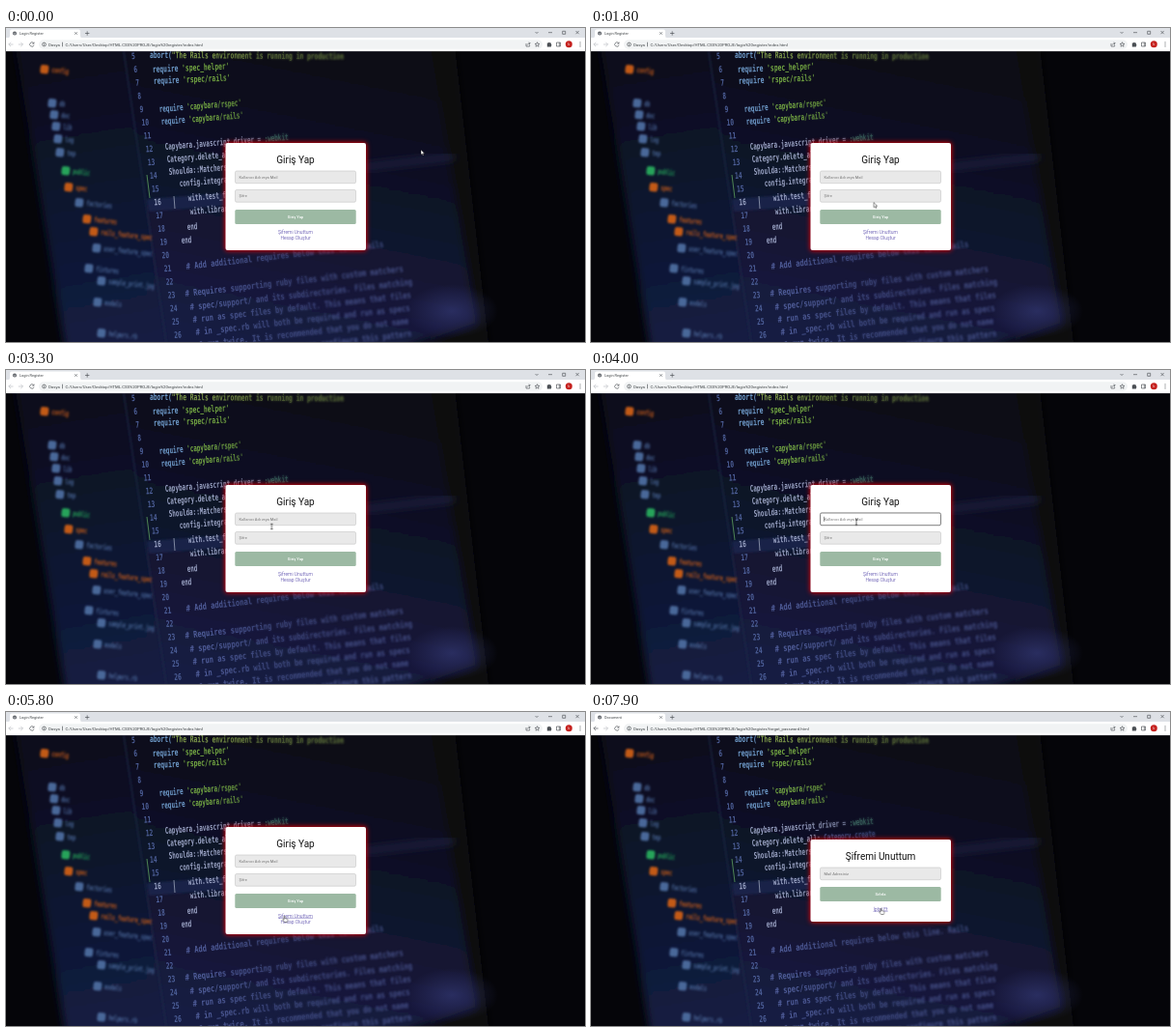
Animation of 600x325 px, one loop 8000 ms. Source, as an HTML page:

```html
<!DOCTYPE html>
<html lang="tr">
<head>
<meta charset="utf-8">
<title>Login Register</title>
<style>
html, body { margin: 0; width: 100%; height: 100%; overflow: hidden; background: #050509; }
svg { display: block; width: 100vw; height: 100vh; }
text { font-family: Roboto, Arial, sans-serif; white-space: pre; }
.ui text { font-size: 4.28px; fill: #3c4043; }
.icon { fill: none; stroke: #4b4f54; stroke-width: .65; }
.code text, .tree text { font-family: "DejaVu Sans Mono", monospace; font-weight: bold; }
.card text { text-anchor: middle; }
.card .title { font-size: 10px; fill: #111; }
.card .hint { font-size: 4.05px; fill: #777; text-anchor: start; }
.card .link { font-size: 5px; font-weight: 300; fill: #3a2b9c; }
.card .label { font-size: 4.1px; font-weight: 500; fill: #fff; }
.glow { fill: #e8000c; filter: url(#halo); }
.field { fill: #e9e9e9; stroke: #c4c4c4; stroke-width: .6; }
.button { fill: #9cb9a3; }
.focus { fill: #fff; stroke: #555; stroke-width: .7; }
.line { stroke: #3a2b9c; stroke-width: .4; }

.step { animation: 8s step-end infinite; opacity: 0; }
.login { animation-name: login; opacity: 1; }
.forgot { animation-name: forgot; }
.user-focus { animation-name: userFocus; }
.pass-focus { animation-name: passFocus; }
.forgot-line { animation-name: forgotLine; }
.cancel-line { animation-name: cancelLine; }
.arrow { animation-name: arrow; }
.beam { animation-name: beam; }
.hand { animation-name: hand; }
.login-button { animation: loginButton 8s linear infinite; }
.reset-button { animation: resetButton 8s linear infinite; }
.caret { animation: blink 1s step-end infinite; }
.pointer { animation: travel 8s ease-in-out infinite; }

@keyframes login { 0% { opacity: 1 } 77.5%, 100% { opacity: 0 } }
@keyframes forgot { 0% { opacity: 0 } 77.5%, 100% { opacity: 1 } }
@keyframes userFocus { 0% { opacity: 0 } 43% { opacity: 1 } 58%, 100% { opacity: 0 } }
@keyframes passFocus { 0% { opacity: 0 } 60% { opacity: 1 } 65%, 100% { opacity: 0 } }
@keyframes forgotLine { 0% { opacity: 0 } 70.2% { opacity: 1 } 77.5%, 100% { opacity: 0 } }
@keyframes cancelLine { 0% { opacity: 0 } 92.5%, 100% { opacity: 1 } }
@keyframes arrow {
  0% { opacity: 1 } 16% { opacity: 0 } 21% { opacity: 1 } 39% { opacity: 0 }
  66% { opacity: 1 } 70.2% { opacity: 0 } 77.5% { opacity: 1 } 80.8% { opacity: 0 }
  88.7% { opacity: 1 } 92.5%, 100% { opacity: 0 }
}
@keyframes beam {
  0% { opacity: 0 } 16% { opacity: 1 } 21% { opacity: 0 } 39% { opacity: 1 }
  66% { opacity: 0 } 80.8% { opacity: 1 } 88.7%, 100% { opacity: 0 }
}
@keyframes hand {
  0% { opacity: 0 } 70.2% { opacity: 1 } 77.5% { opacity: 0 } 92.5%, 100% { opacity: 1 }
}
@keyframes loginButton {
  0%, 26% { fill: #9cb9a3 } 29%, 37% { fill: #020804 } 40%, 66% { fill: #9cb9a3 }
  67.5%, 68.5% { fill: #3c4840 } 71%, 100% { fill: #9cb9a3 }
}
@keyframes resetButton {
  0%, 79% { fill: #9cb9a3 } 80.5% { fill: #4c5a50 } 82.4%, 88.6% { fill: #9cb9a3 }
  90.8% { fill: #3c4840 } 94%, 100% { fill: #9cb9a3 }
}
@keyframes blink { 50% { opacity: 0 } }
@keyframes travel {
  0%, 4% { transform: translate(430px, 126px) }
  14% { transform: translate(325px, 164px) }
  22.5% { transform: translate(293px, 180.5px) }
  32.5%, 36% { transform: translate(277.5px, 192.5px) }
  43%, 54% { transform: translate(275px, 157.5px) }
  59%, 64% { transform: translate(271px, 175px) }
  72.5%, 76.5% { transform: translate(288.5px, 211px) }
  82.5%, 87% { transform: translate(271.5px, 171px) }
  95%, 100% { transform: translate(300.5px, 203px) }
}
</style>
</head>
<body>
<svg viewBox="0 0 600 325" preserveAspectRatio="none">
  <defs>
    <linearGradient id="screen" gradientUnits="userSpaceOnUse" x1="330" y1="24" x2="270" y2="325">
      <stop offset="0" stop-color="#0a0b16"/>
      <stop offset=".5" stop-color="#10132a"/>
      <stop offset="1" stop-color="#171c42"/>
    </linearGradient>
    <linearGradient id="side" gradientUnits="userSpaceOnUse" x1="60" y1="24" x2="110" y2="325">
      <stop offset="0" stop-color="#090d1c"/>
      <stop offset=".5" stop-color="#0e152e"/>
      <stop offset="1" stop-color="#131d42"/>
    </linearGradient>
    <radialGradient id="haze">
      <stop offset="0" stop-color="#343a75" stop-opacity=".65"/>
      <stop offset="1" stop-color="#343a75" stop-opacity="0"/>
    </radialGradient>
    <linearGradient id="near" gradientUnits="userSpaceOnUse" x1="210" x2="340">
      <stop offset="0" stop-color="#fff"/>
      <stop offset="1" stop-color="#000"/>
    </linearGradient>
    <linearGradient id="far" href="#near" x1="340" x2="210"/>
    <mask id="sharpSide" maskUnits="userSpaceOnUse" width="600" height="360"><rect width="600" height="360" fill="url(#near)"/></mask>
    <mask id="blurSide" maskUnits="userSpaceOnUse" width="600" height="360"><rect width="600" height="360" fill="url(#far)"/></mask>
    <filter id="soft" x="-20%" y="-20%" width="140%" height="140%"><feGaussianBlur stdDeviation="4"/></filter>
    <filter id="halo" x="-20%" y="-20%" width="140%" height="140%"><feGaussianBlur stdDeviation="2.6"/></filter>
    <filter id="blur"><feGaussianBlur stdDeviation="1"/></filter>
    <filter id="edge"><feGaussianBlur stdDeviation=".35"/></filter>
    <clipPath id="page"><rect y="24" width="600" height="301"/></clipPath>
  </defs>

  <g clip-path="url(#page)">
    <rect y="24" width="600" height="301" fill="#050509"/>
    <g filter="url(#soft)">
      <path d="M430 10H464L501 335H440Z" fill="#0c0c11"/>
      <path d="M100 10H438L487 305L400 335H150Z" fill="url(#screen)"/>
      <path d="M8 10H121L165 335H62Z" fill="url(#side)"/>
    </g>
    <ellipse cx="462" cy="293" rx="48" ry="28" fill="url(#haze)"/>
    <path d="M345 147L465 133" stroke="#24254a" stroke-width="5" filter="url(#soft)"/>
    <path d="M122 24L166 325" stroke="#1c2749" stroke-width="1.2" filter="url(#blur)"/>
    <path d="M146 177L226 171V184L148 190Z" fill="#1e2750" opacity=".8" filter="url(#blur)"/>
    <g class="tree" id="tree" filter="url(#blur)"></g>
    <g mask="url(#sharpSide)"><g filter="url(#edge)"><g class="code" id="code"></g></g></g>
    <g mask="url(#blurSide)"><use href="#code" filter="url(#blur)" opacity=".85"/></g>
    <path d="M146 152L149 176" stroke="#4d8554"/>
    <path d="M174 174L175 187" stroke="#9aa2b8" stroke-width=".8"/>
  </g>

  <g class="ui">
    <rect width="600" height="10.500" fill="#dee1e6"/>
    <path d="M2 10.500Q4 10 4 8V3.500Q4 1.500 6 1.500H75Q77 1.500 77 3.500V8Q77 10 79 10.500Z" fill="#fff"/>
    <rect y="10" width="600" height="14" fill="#fff"/>
    <rect x="34" y="12.300" width="522" height="9.400" rx="4.700" fill="#f1f3f4"/>
    <path d="M0 23.800H600" stroke="#d8dadd" stroke-width=".5"/>
    <circle cx="9" cy="5.500" r="2.100" fill="#5f6368"/>
    <path class="icon" d="M7.500 5L9 6.500L10.500 4.600" style="stroke:#dfe1e5"/>
    <path class="icon" d="M71.300 4.300l2.400 2.400m0-2.400l-2.400 2.400M82 5.500h4.400M84.200 3.300v4.400"/>
    <path class="icon" d="M548.500 4l1.500 1.500 1.500-1.500M562 4.700h4M576.700 3.300h3v3h-3zM590.500 3l3.200 3.200m0-3.200l-3.200 3.200"/>
    <path class="icon step login" d="M7.500 17H2.800M5 14.800L2.800 17L5 19.200" style="stroke:#b9bcc0"/>
    <path class="icon step forgot" d="M7.500 17H2.800M5 14.800L2.800 17L5 19.200"/>
    <path class="icon" d="M12.800 17h4.700M15.300 14.800l2.200 2.200-2.200 2.200" style="stroke:#b9bcc0"/>
    <path class="icon" d="M28.600 15.600A2.200 2.200 0 1 0 29 17.600M29 14.500v1.700h-1.700"/>
    <circle class="icon" cx="39.500" cy="17" r="1.900"/>
    <path class="icon" d="M39.500 16.600v1.500M39.500 15.600v.4M58.500 14.700v4.600"/>
    <path class="icon" d="M539 16v3h3.600v-1.500M540.300 17.500q.3-1.700 2.700-1.700m-1-1.200l1.200 1.200-1.200 1.200"/>
    <path class="icon" d="M550.500 14.700l.7 1.600 1.700.1-1.300 1.100.4 1.700-1.500-.9-1.500.9.400-1.700-1.300-1.100 1.700-.1z"/>
    <path d="M560.800 15.600h1.300a.8.8 0 0 1 1.600 0h1.200v1.300a.8.800 0 0 1 0 1.500v1.200h-4.100z" fill="#4b4f54"/>
    <path class="icon" d="M570.500 15h4v4h-4zM573.300 15v4"/>
    <circle cx="583.300" cy="16.800" r="3.500" fill="#c5221f"/>
    <text x="583.300" y="18" text-anchor="middle" style="font-size:3.200px;fill:#fff">k</text>
    <path d="M595 14.900v.1M595 16.900v.1M595 18.900v.1" stroke="#4b4f54" stroke-width="1" stroke-linecap="round"/>
    <text x="44" y="18.500">Dosya</text>
    <text class="step login" x="14" y="7" style="font-size:3.900px">Login Register</text>
    <text class="step forgot" x="14" y="7" style="font-size:3.900px">Document</text>
    <text class="step login" x="61.500" y="18.500">C:/Users/User/Desktop/HTML.CSS%20PROJE/login%20register/index.html</text>
    <text class="step forgot" x="61.500" y="18.500">C:/Users/User/Desktop/HTML.CSS%20PROJE/login%20register/forgot_password.html</text>
  </g>

  <g class="card step login">
    <rect class="glow" x="227" y="118.500" width="146.500" height="112" rx="2"/>
    <rect x="227.500" y="119" width="145.500" height="111" rx="2" fill="#fff"/>
    <text class="title" x="300" y="140.300">Giriş Yap</text>
    <rect class="field" x="237.500" y="148" width="125" height="12.700" rx="1.500"/>
    <rect class="field" x="237.500" y="167.500" width="125" height="12.700" rx="1.500"/>
    <g class="step user-focus">
      <rect class="focus" x="237.500" y="148" width="125" height="12.700" rx="1.500"/>
      <path class="caret" d="M241.300 151.800v5" stroke="#111" stroke-width=".6"/>
    </g>
    <g class="step pass-focus">
      <rect class="focus" x="237.500" y="167.500" width="125" height="12.700" rx="1.500"/>
      <path class="caret" d="M241.300 171.300v5" stroke="#111" stroke-width=".6"/>
    </g>
    <text class="hint" x="241.500" y="155.800">Kullanıcı Adı veya Mail</text>
    <text class="hint" x="241.500" y="175.400">Şifre</text>
    <rect class="button login-button" x="237.300" y="188" width="125.400" height="15" rx="1.500"/>
    <text class="label" x="300" y="197">Giriş Yap</text>
    <text class="link" x="300" y="212.900">Şifremi Unuttum</text>
    <path class="line step forgot-line" d="M282 213.700h36"/>
    <text class="link" x="300" y="218.900">Hesap Oluştur</text>
  </g>

  <g class="card step forgot">
    <rect class="glow" x="227" y="131.500" width="146.500" height="86" rx="2"/>
    <rect x="227.500" y="132" width="145.500" height="85" rx="2" fill="#fff"/>
    <text class="title" x="300" y="153.300">Şifremi Unuttum</text>
    <rect class="field" x="237.500" y="161" width="125" height="12.700" rx="1.500"/>
    <text class="hint" x="241.500" y="168.800">Mail Adresiniz</text>
    <rect class="button reset-button" x="237.300" y="181" width="125.400" height="15" rx="1.500"/>
    <text class="label" x="300" y="190">Sıfırla</text>
    <text class="link" x="300" y="206">İptal Et</text>
    <path class="line step cancel-line" d="M292.300 206.800h15.400"/>
  </g>

  <g class="pointer">
    <path class="step arrow" d="M0 0V5.200L1.200 4.100L2 5.900L2.900 5.500L2.100 3.800H3.700Z" fill="#fff" stroke="#111" stroke-width=".45"/>
    <path class="step beam" d="M-1.200-2.700H1.200M0-2.700V2.700M-1.200 2.700H1.200" fill="none" stroke="#111" stroke-width=".6"/>
    <path class="step hand" d="M-.5 .5Q0-.4.500.5V2.500L3 3.200Q3.600 3.500 3.400 4.500L2.800 6.500H0L-1.900 4Q-1.800 3.200-.5 4Z" fill="#fff" stroke="#111" stroke-width=".45"/>
  </g>
</svg>
<script>
const plain = "#9aa3c4", keyword = "#6f9ccb", string = "#74a843", comment = "#4f5c98", dim = "#4f629c";
const folder = "#4a6799", orange = "#c25a18", green = "#26a35a";
const svgNode = (parent, name, attrs, content = "") => {
  const node = document.createElementNS("http://www.w3.org/2000/svg", name);
  for (const key in attrs) node.setAttribute(key, attrs[key]);
  node.textContent = content;
  parent.appendChild(node);
  return node;
};

// Each line lies on the tilted monitor: x, y, tilt, then colour and text pairs.
const codeLines = [
  [149, 31, .4, keyword, "abort(", "#7f9a4a", "\"The Rails environment is running in production"],
  [152, 46, -2.5, keyword, "require ", string, "'spec_helper'"],
  [153, 58, -2.5, keyword, "require ", string, "'rspec/rails'"],
  [159, 87, -4.5, keyword, "require ", string, "'capybara/rspec'"],
  [161, 100, -4.5, keyword, "require ", string, "'capybara/rails'"],
  [165, 126, -4.5, plain, "Capybara.javascript_driver = ", "#4f8a78", ":webkit"],
  [167, 139, -4.5, plain, "Category.delete_all; ", dim, "Category.create"],
  [169, 152, -4.5, plain, "Shoulda::Matchers.configure do"],
  [180, 164, -4.5, plain, "config.integrate do"],
  [189, 179, -4.5, plain, "with.test_framework"],
  [191, 193, -4.5, plain, "with.library"],
  [188, 209, -4.5, plain, "end"],
  [182, 223, -4.5, plain, "end"],
  [187, 250, -6.5, comment, "# Add additional requires below this line. Rails"],
  [186, 278, -6.5, comment, "# Requires supporting ruby files with custom matchers"],
  [191, 292, -6.5, comment, "# spec/support/ and its subdirectories. Files matching"],
  [194, 305, -6.5, comment, "# run as spec files by default. This means that files"],
  [197, 318, -6.5, comment, "# in _spec.rb will both be required and run as specs"],
  [200, 331, -6.5, comment, "# run twice. It is recommended that you do not name"],
  [203, 344, -6.5, comment, "# end with _spec.rb. You can configure this pattern"]
];
const code = document.getElementById("code");
for (const [x, y, tilt, ...parts] of codeLines) {
  const squeeze = y > 240 ? .76 : y < 60 ? .67 : .63;
  const row = svgNode(code, "text", { transform: `translate(${x} ${y}) rotate(${tilt}) scale(${squeeze} 1)`, "font-size": 9.4 });
  for (let i = 0; i < parts.length; i += 2) svgNode(row, "tspan", { fill: parts[i] }, parts[i + 1]);
}
for (let n = 5; n <= 26; n++) {
  const k = n - 12;
  svgNode(code, "text", {
    transform: `translate(${145 + 2.1 * k} ${128.5 + 13.75 * k}) rotate(-4) scale(.7 1)`,
    "font-size": 9, fill: n === 16 ? plain : dim
  }, n);
}

const treeItems = [
  [47, 46, "config", orange], [55, 81, "db", folder], [57, 93, "doc", folder], [59, 105, "lib", folder],
  [61, 118, "log", folder], [63, 132, "tmp", folder], [69, 151, "public", green], [72, 168, "spec", orange],
  [83, 184, "factories", folder], [91, 201, "features", orange], [98, 214, "rails_feature_spec", orange],
  [101, 231, "user_feature_spec", folder], [93, 252, "fixtures", folder], [106, 265, "sample_print.jpg", folder],
  [102, 287, "models", folder], [106, 319, "helpers.rb", folder]
];
const tree = document.getElementById("tree");
for (const [x, y, name, fill] of treeItems) {
  const item = svgNode(tree, "g", { transform: `translate(${x} ${y}) rotate(6) scale(.62 1)`, fill });
  svgNode(item, "rect", { x: -19, y: -7, width: 14, height: 9, rx: 3 });
  svgNode(item, "text", { "font-size": 8 }, name);
}
</script>
</body>
</html>
```
